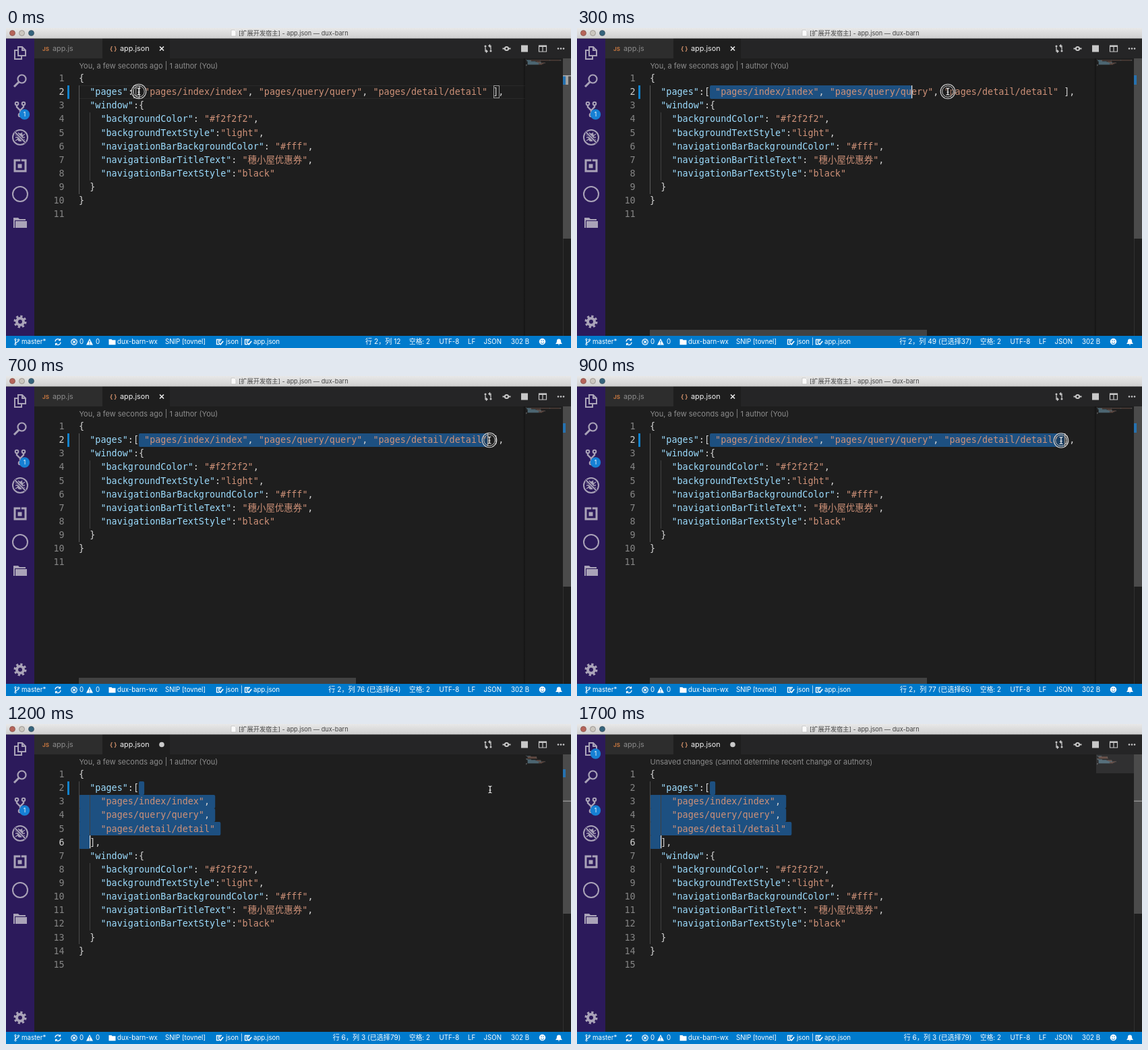
Recreate the animation shown at these times as an HTML page with a canvas. Size 838 by 474 pixels, loop 1800 ms.

```html
<!DOCTYPE html>
<html lang="zh">
<head>
<meta charset="utf-8">
<style>
html, body { margin: 0; width: 100%; height: 100%; overflow: hidden; background: #1e1e1e; }
canvas { display: block; }
</style>
</head>
<body>
<canvas id="stage" width="838" height="474"></canvas>
<script>
const ctx = document.getElementById('stage').getContext('2d', { alpha: false });
const UI = 'Inter, "Noto Sans CJK SC", "Noto Sans CJK", sans-serif';
const MONO = '13.43px "DejaVu Sans Mono", "Noto Sans CJK SC", "Noto Sans CJK", monospace';
const LEFT = 108.1, CHAR = 8.085, TOP = 64.6, ROW = 20.13;
const LOOP = 1800, STEP = 100, FORMATTED = 1200, UNSAVED = 1500;
const ICON = '#aaa3b8', BAR = '#2c1a5b', BLUE = '#1680d4', STATUS = '#007acc';
const SELECTION = '#1d5081';

const windowLines = `  "window":{
    "backgroundColor": "#f2f2f2",
    "backgroundTextStyle":"light",
    "navigationBarBackgroundColor": "#fff",
    "navigationBarTitleText": "穗小屋优惠券",
    "navigationBarTextStyle":"black"
  }
}
`.split('\n');
const compact = ['{',
  '  "pages":[ "pages/index/index", "pages/query/query", "pages/detail/detail" ],',
  ...windowLines];
const expanded = ['{', '  "pages":[', '    "pages/index/index",', '    "pages/query/query",',
  '    "pages/detail/detail"', '  ],', ...windowLines];

// [time, x, y] of the pointer and [time, column] of the selection end
const pointerKeys = [[0, 197, 94], [100, 297, 93], [200, 421, 93], [300, 550, 94], [400, 658, 95],
  [500, 709, 95], [700, 717, 95], [1100, 719, 96], [1200, 718, 97]];
const columnKeys = [[0, 12], [100, 19], [200, 31], [400, 66], [500, 75], [700, 76], [900, 77]];

function sample(keys, t, k) {
  const i = keys.findIndex(key => key[0] > t);
  if (i < 0) return keys[keys.length - 1][k];
  const a = keys[i - 1], b = keys[i];
  return a[k] + (b[k] - a[k]) * (t - a[0]) / (b[0] - a[0]);
}

function rect(x, y, w, h, color, radius = 0) {
  ctx.fillStyle = color;
  ctx.beginPath();
  ctx.roundRect(x, y, w, h, radius);
  ctx.fill();
}

function disc(x, y, r, color) {
  rect(x - r, y - r, 2 * r, 2 * r, color, r);
}

function ring(x, y, r, color, width = 1) {
  ctx.strokeStyle = color;
  ctx.lineWidth = width;
  ctx.beginPath();
  ctx.arc(x, y, r, 0, 7);
  ctx.stroke();
}

function text(str, x, y, color, font = `9.7px ${UI}`, align = 'left') {
  ctx.font = font;
  ctx.textAlign = align;
  ctx.fillStyle = color;
  ctx.fillText(str, x, y);
}

function icon(x, y, path, color, width) {
  const shape = new Path2D(path);
  ctx.save();
  ctx.translate(x, y);
  ctx.lineWidth = width || 1;
  ctx.strokeStyle = ctx.fillStyle = color;
  if (width) ctx.stroke(shape); else ctx.fill(shape);
  ctx.restore();
}

const columnX = column => LEFT + (column - 1) * CHAR;
const rowY = line => Math.round(TOP + (line - 1) * ROW);

function drawTitle() {
  const shade = ctx.createLinearGradient(0, 0, 0, 15);
  shade.addColorStop(0, '#e8e8e8');
  shade.addColorStop(1, '#d0d0d0');
  rect(0, 0, 838, 15.5, shade);
  ['#b5645a', '#cbc7c0', '#35637c'].forEach((color, i) => {
    disc(9.5 + i * 14, 7.5, 4.3, color);
    ring(9.5 + i * 14, 7.5, 4, 'rgba(70,60,60,.5)', .7);
  });
  rect(334, 3, 7, 9, '#fafafa');
  icon(337.5, 7.5, 'M-3.5-4.5h5l2 2v7h-7z', '#b5b5b5', .6);
  text('[扩展开发宿主] - app.json — dux-barn', 345, 11.3, '#464646', `9.2px ${UI}`);
}

function drawTabs(dirty) {
  rect(42, 15, 796, 30, '#252526');
  rect(42, 15, 101, 30, '#2d2d2d');
  rect(143, 15, 100, 30, '#1e1e1e');
  text('JS', 54, 33.5, '#c9783f', `bold 8px ${UI}`);
  text('app.js', 69, 34.3, '#8c8c8c', `10.8px ${UI}`);
  text('{ }', 154, 33.7, '#ce8e68', `bold 9px ${UI}`);
  text('app.json', 169, 34.3, '#f2f2f2', `10.8px ${UI}`);
  if (dirty) disc(231, 30.5, 3.8, '#c9c9c9');
  else icon(231, 30.5, 'M-3-3l6 6M3-3l-6 6', '#ededed', 1.6);

  const tint = '#c8c8c8';
  icon(715, 30.5, 'M-4-2v6h3M-3 2l2 2-2 2M4 2v-6h-3M3-6l-2 2 2 2', tint, 1.3);
  disc(711, 27, 1.5, tint);
  disc(719, 34, 1.5, tint);
  ring(742.5, 30.5, 2.6, tint, 2);
  icon(742.5, 30.5, 'M-6 0h3M3 0h3', tint, 2);
  rect(764, 25.5, 10, 10, tint);
  icon(796, 30.5, 'M-5.5-4h11v8.5h-11zM0-4v8', tint, 1.2);
  rect(790, 25.5, 12, 2.5, tint);
  for (const x of [819, 823, 827]) disc(x, 30.5, 1.3, tint);
}

function badge(y) {
  disc(27.5, y, 7.7, BLUE);
  text('1', 27.5, y + 3.1, '#fff', `8.5px ${UI}`, 'center');
}

function drawActivityBar(unsaved) {
  rect(0, 15.5, 42, 440.5, BAR);
  icon(21, 37, 'M-3-9h6l5 5v8h-11zM3-9v5h5M-3-4h-5v13h10v-4', ICON, 2);
  ring(23.5, 75.5, 6, ICON, 2.2);
  icon(21, 78, 'M-2 2l-7 7', ICON, 3);
  icon(21, 120, 'M-5-6v3l5 5 5-5v-3M0 1v6', ICON, 2.4);
  for (const [x, y] of [[16, 112], [26, 112], [21, 129]]) ring(x, y, 2.3, ICON, 2);
  ring(21, 162, 11, ICON, 2);
  icon(21, 162, 'M-4-2a4 4 0 0 1 8 0v4a4 4 0 0 1-8 0z', ICON);
  icon(21, 162, 'M-7-4l14 8M-7 0h14M-7 5l4-3M7-5l-4 3M-3-7l2 3M3-7l-2 3', ICON, 1.4);
  icon(21, 162, 'M-8-8l16 16', BAR, 3.6);
  icon(21, 162, 'M-8-8l16 16', ICON, 1.8);
  icon(21, 204, 'M-8-8h16v16h-16z', ICON, 3);
  rect(17.5, 201.5, 6, 6, ICON);
  icon(21, 204, 'M1-10v5h5', BAR, 1.5);
  ring(21, 246, 11, ICON, 2);
  icon(21, 289, 'M-10-8h7l2 2h9v2h-16v11h-2zM-7-3h17v10h-17z', ICON);
  ctx.setLineDash([3, 2.89]);
  ring(21, 435, 7.5, ICON, 4);
  ctx.setLineDash([]);
  ring(21, 435, 5, ICON, 4);
  badge(128);
  if (unsaved) badge(44);
}

function drawStatus(position) {
  const white = '#fff';
  rect(0, 456, 838, 18, STATUS);
  icon(16, 465, 'M-2-2v5M2.5-2c0 3-4 2-4.5 4', white, 1.2);
  for (const [x, y] of [[14, 461.5], [18.5, 462], [14, 468.5]]) ring(x, y, 1.2, white);
  icon(77, 465, 'M-4-.5a4 4 0 0 1 7-2.5M4 .5a4 4 0 0 1-7 2.5M3.5-5v2.6h-2.6M-3.5 5v-2.6h2.6', white, 1.2);
  ring(101, 465, 4.2, white, 1.2);
  icon(101, 465, 'M-2-2l4 4M2-2l-4 4', white, 1.2);
  icon(124, 465, 'M0-5l5 9.5h-10z', white);
  icon(124, 465, 'M0-2v3.3M0 2.3v1.2', STATUS, 1.1);
  icon(157.5, 465, 'M-5-4h4l1 1.3h5v7h-10z', white);
  for (const x of [317, 359]) {
    icon(x, 465, 'M3-3.5h-7.500v7h4M-2.500-1.500h4M-2.500.5h2', white, 1.3);
    icon(x, 465, 'M-1 1.500l2.200 2.200 4-5', white, 1.6);
  }
  const labels = [['master*', 23], ['0', 109], ['0', 133], ['dux-barn-wx', 165], ['SNIP [tovnel]', 236],
    ['json |', 326], ['app.json', 367], ['空格: 2', 598], ['UTF-8', 642.5], ['LF', 685],
    ['JSON', 708.5], ['302 B', 749]];
  for (const [label, x] of labels) text(label, x, 468.3, white);
  text(position, 585.5, 468.3, white, `10.1px ${UI}`, 'right');
  disc(795.5, 464.5, 4.7, white);
  disc(794, 463.3, .8, STATUS);
  disc(797, 463.3, .8, STATUS);
  icon(795.5, 465, 'M-2.5 1q2.5 3 5 0', STATUS, 1);
  icon(820, 465, 'M-5 3q2-1.500 2-4.500a3 3 0 0 1 6 0q0 3 2 4.500zM-1.300 3.600h2.600l-1.300 1.400z', white);
}

function select(line, from, to) {
  rect(columnX(from), rowY(line), (to - from) * CHAR, rowY(line + 1) - rowY(line), SELECTION, 2);
}

function guide(column, first, last, color = '#404040') {
  rect(Math.floor(columnX(column)), rowY(first), 1, rowY(last + 1) - rowY(first), color);
}

function caret(line, column) {
  rect(Math.round(columnX(column)), rowY(line), 1.3, ROW - 1, '#e0e0e0');
}

function tokens(line) {
  return (line.match(/"[^"]*":?|[^"]+/g) || []).flatMap(part =>
    part.endsWith('":') ? [[part.slice(0, -1), '#9cdcfe'], [':', '#d4d4d4']]
      : [[part, part[0] === '"' ? '#ce9178' : '#d4d4d4']]);
}

function drawCode(lines, activeLine) {
  lines.forEach((line, i) => {
    const y = TOP + i * ROW + 14.4;
    text(i + 1, 86.7, y, i + 1 === activeLine ? '#d0d0d0' : '#858585', MONO, 'right');
    let x = LEFT, mapX = 771;
    for (const [part, color] of tokens(line)) {
      text(part, x, y, color, MONO);
      x += ctx.measureText(part).width;
      ctx.globalAlpha = .55;
      if (part.trim()) rect(mapX, 46.5 + i, part.length * .67, .75, color);
      ctx.globalAlpha = 1;
      mapX += part.length * .67;
    }
  });
}

function drawScrollbar(height) {
  rect(826, 45, 1, 411, '#303030');
  rect(826, 45, 12, height, '#4b4b4b');
}

function drawPointer(x, y, pressed) {
  if (pressed) {
    disc(x, y, 11, 'rgba(30,30,30,.3)');
    ring(x, y, 10.8, '#d8d8d8', 1.1);
    ring(x, y, 8.3, '#c8c8c8', 1);
  }
  icon(x, y, 'M-2.500-5q2 0 2.500 1q.5-1 2.500-1M0-4v8M-2.500 5q2 0 2.500-1q.5 1 2.500 1M-1.500 1h3', '#f4f4f4', 1.2);
}

function drawCompact(t) {
  const column = Math.round(sample(columnKeys, t, 1));
  const selected = column - 12;
  if (selected) {
    select(2, 12, column);
    rect(108, 447, 411, 9, '#424242');
  } else {
    rect(LEFT, rowY(2), 662, 1, '#2a2a2a');
    rect(LEFT, rowY(3) - 1, 662, 1, '#2a2a2a');
    ctx.strokeStyle = '#999';
    ctx.lineWidth = 1;
    for (const c of [11, 77]) ctx.strokeRect(Math.round(columnX(c)) + .5, 85.5, 8, 18);
  }
  const edge = ctx.createLinearGradient(766, 0, 770, 0);
  edge.addColorStop(0, 'rgba(0,0,0,0)');
  edge.addColorStop(1, 'rgba(0,0,0,.3)');
  rect(766, 45, 4, 411, edge);
  guide(1, 2, 9, '#5c5c5c');
  guide(3, 4, 8);
  drawCode(compact, 2);
  caret(2, column);
  drawScrollbar(267);
  rect(826, 70, 4, 14, '#2672b0');
  if (!selected) {
    rect(830, 70, 4, 14, '#a0a0a0');
    rect(826, 70, 12, 1.5, '#aaa');
  }
  return `行 2，列 ${column}` + (selected ? ` (已选择${selected})` : '');
}

function drawExpanded(unsaved) {
  select(2, 12, 13);
  select(3, 1, 26);
  select(4, 1, 26);
  select(5, 1, 27);
  select(6, 1, 3);
  guide(1, 2, 13, '#4c4c4c');
  guide(3, 3, 5);
  guide(3, 8, 12);
  if (unsaved) rect(770, 45, 56, 28, '#303031');
  drawCode(expanded, 6);
  caret(6, 3);
  drawScrollbar(236);
  if (!unsaved) rect(826, 67, 4, 12, '#2672b0');
  rect(826, 113.5, 12, 1.5, '#8f8f8f');
  return '行 6，列 3 (已选择79)';
}

function draw() {
  const t = Math.floor(performance.now() % LOOP / STEP) * STEP;
  const formatted = t >= FORMATTED, unsaved = t >= UNSAVED;
  rect(0, 0, 838, 474, '#1e1e1e');
  text(unsaved ? 'Unsaved changes (cannot determine recent change or authors)'
    : 'You, a few seconds ago | 1 author (You)', 108.5, 60.4, '#8c8c8c', `11px ${UI}`);
  if (!unsaved) rect(91, 85, 3, 20, '#1182cc');
  const position = formatted ? drawExpanded(unsaved) : drawCompact(t);
  drawTabs(formatted);
  drawActivityBar(unsaved);
  drawTitle();
  drawStatus(position);
  if (t <= FORMATTED)
    drawPointer(sample(pointerKeys, t, 1), sample(pointerKeys, t, 2), t < 1000);
  requestAnimationFrame(draw);
}
draw();
</script>
</body>
</html>
```
